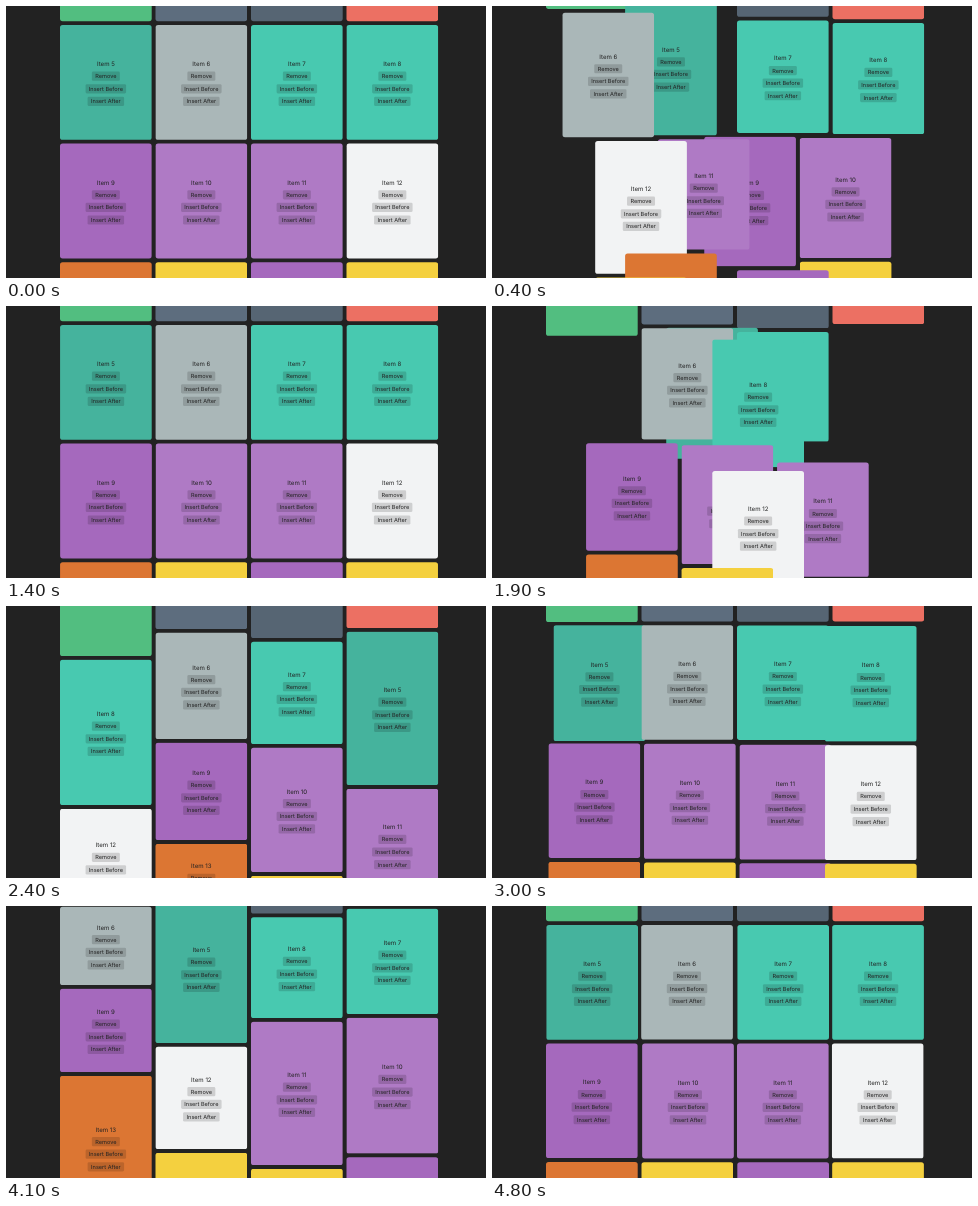
Animation, 480 px wide and 272 px high, one loop 4900 ms. Source, as an HTML page:

```html
<!DOCTYPE html>
<html lang="en">
<head>
<meta charset="utf-8">
<title>Masonry cards</title>
<style>
html, body { margin: 0; width: 100%; height: 100%; overflow: hidden; background: #222; }
svg { display: block; width: 480px; height: 272px; }
text {
  font-family: Inter, Roboto, sans-serif;
  fill: #222;
  text-anchor: middle;
  text-rendering: geometricPrecision;
}
.title { font-size: 6.1px; }
.label { font-size: 5.6px; }
.button { fill: #000; fill-opacity: .15; }
.card, .face { animation: 4900ms ease infinite; }
</style>
</head>
<body>
<svg id="stage" viewBox="0 0 480 272"></svg>
<script>
const LOOP = 4900, MOVE = 400;
const LEFT = 54, TOP = -99.6, WIDTH = 91.7, GAP = 3.8, COLUMNS = 4;

const colors = [
  '#52be80', '#5d6d7e', '#566573', '#ec7063',
  '#45b39d', '#aab7b8', '#48c9b0', '#48c9b0',
  '#a569bd', '#af7ac5', '#af7ac5', '#f2f3f4',
  '#dc7633', '#f4d03f', '#a569bd', '#f4d03f'
];

// Puts each card into the column that is shortest so far.
function pack(heights) {
  const ends = Array(COLUMNS).fill(TOP);
  return colors.map((_, i) => {
    const h = heights[i] || 120;
    const col = ends.indexOf(Math.min(...ends));
    const y = ends[col];
    ends[col] += h + GAP;
    return { x: LEFT + col * (WIDTH + GAP) + WIDTH / 2, y: y + h / 2, h };
  });
}

const grid = pack(Array(16).fill(114.8));
const first = pack([100, 85.6, 109.5, 112.4, 138.6, 126.4, 111.8, 110.3,
  132.7, 121.3, 109.6, 136.6]);
const second = pack([149.6, 122.6, 131.6, 121.6, 153.2, 106.2, 102.2, 145.2,
  97.2, 124.2, 113.6, 109.4, 81.4]);
const third = pack([96.6, 83.6, 107.1, 98.6, 149.2, 78.2, 105.2, 100.7,
  83.2, 135.7, 143.2, 102.2, 144]);

// Start time of each move and the layout it leads to.
const moves = [
  [190, first], [1016, grid], [1799, second],
  [2684, grid], [3560, third], [4432, grid]
];

function keyframes(name, i, style) {
  const step = (ms, layout) => `${(ms / LOOP * 100).toFixed(3)}% { ${style(layout[i])} }`;
  let from = grid;
  const steps = [step(0, grid)];
  for (const [start, to] of moves) {
    steps.push(step(start, from), step(start + MOVE, to));
    from = to;
  }
  steps.push(step(LOOP, grid));
  return `@keyframes ${name}${i} { ${steps.join(' ')} }`;
}

const button = (label, y, w) =>
  `<rect class="button" x="${-w / 2}" y="${y - 4.6}" width="${w}" height="9.2" rx="1.3"/>
   <text class="label" y="${y + 2}">${label}</text>`;

const card = (color, i) =>
  `<g class="card" style="animation-name: move${i}">
     <rect class="face" style="animation-name: size${i}" x="${-WIDTH / 2}" width="${WIDTH}" rx="2.6" fill="${color}"/>
     <text class="title" y="-16.3">Item ${i + 1}</text>
     ${button('Remove', -6.2, 28)}
     ${button('Insert Before', 6.4, 40.5)}
     ${button('Insert After', 19, 36.5)}
   </g>`;

const sheet = document.createElement('style');
sheet.textContent = colors.map((_, i) =>
  keyframes('move', i, c => `transform: translate(${c.x.toFixed(2)}px, ${c.y.toFixed(2)}px);`) +
  keyframes('size', i, c => `y: ${(-c.h / 2).toFixed(2)}px; height: ${c.h.toFixed(2)}px;`)
).join('\n');
document.head.append(sheet);
document.getElementById('stage').innerHTML = colors.map(card).join('');
</script>
</body>
</html>
```
